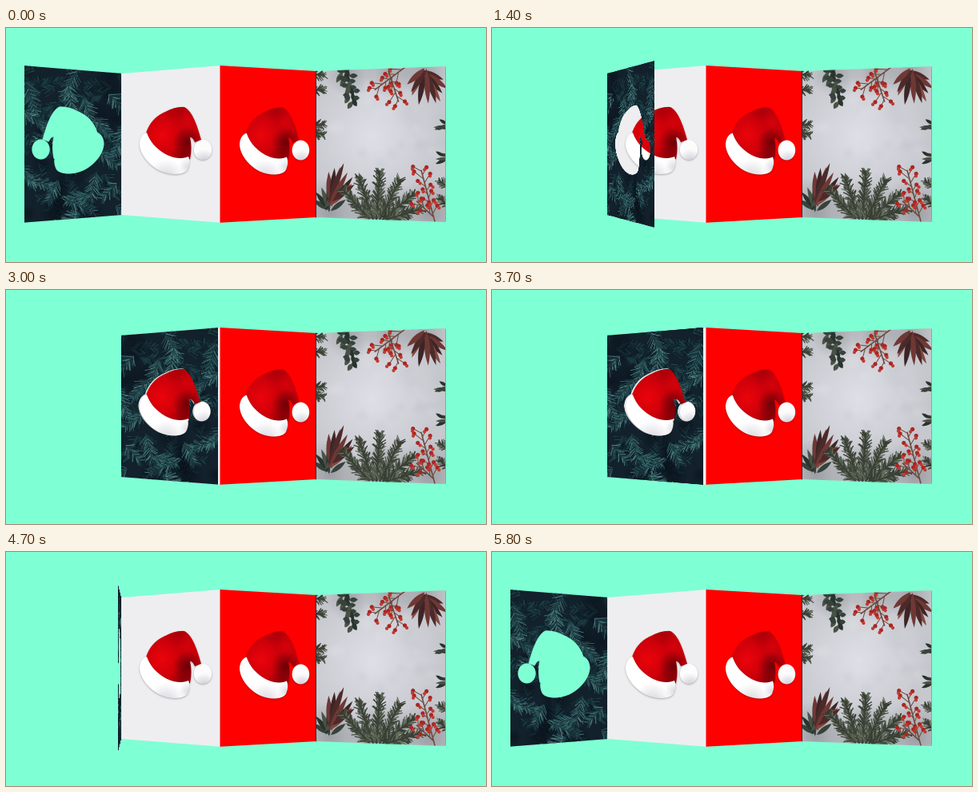
An HTML page with a canvas that plays this animation: 600x293 px, repeating every 5.9 s.

```html
<!DOCTYPE html>
<html lang="en">
<head>
<meta charset="utf-8">
<title>Folding card</title>
<style>
  html, body { margin: 0; width: 100%; height: 100%; overflow: hidden; background: #7fffd4; }
  canvas { display: block; }
</style>
</head>
<body>
<canvas id="stage" width="600" height="293"></canvas>
<script>
const W = 600, H = 293, RES = 2, TAU = Math.PI * 2;
const LOOP = 5900, STEP = 100, FOLD_START = -30, UNFOLD_END = 5810, FOLD_TIME = 2260;
const HINGE = 144, MID = 145.5, FLAP = 137, DEPTH = 850;
const CLOSED = 37 * Math.PI / 180, OPEN = Math.PI - CLOSED;

let seed = 11;
function rnd(a, b) {
  seed = (seed * 16807) % 2147483647;
  return a + (b - a) * seed / 2147483647;
}
const pick = list => list[Math.floor(rnd(0, list.length))];

function layer() {
  const c = document.createElement('canvas');
  c.width = W * RES;
  c.height = H * RES;
  const g = c.getContext('2d');
  g.scale(RES, RES);
  g.lineCap = 'round';
  return g;
}

function quad(g, x0, t0, b0, x1, t1, b1) {
  g.beginPath();
  g.moveTo(x0, t0);
  g.lineTo(x1, t1);
  g.lineTo(x1, b1);
  g.lineTo(x0, b0);
  g.closePath();
}

function dot(g, x, y, r, color) {
  g.fillStyle = color;
  g.beginPath();
  g.arc(x, y, r, 0, TAU);
  g.fill();
}

function glow(g, x, y, r, rgb, alpha) {
  const grad = g.createRadialGradient(x, y, 0, x, y, r);
  grad.addColorStop(0, `rgba(${rgb},${alpha})`);
  grad.addColorStop(1, `rgba(${rgb},0)`);
  g.fillStyle = grad;
  g.fillRect(x - r, y - r, r * 2, r * 2);
}

// Draws a line from a point and returns its far end.
function ray(g, x, y, angle, len, color, width) {
  const end = [x + Math.cos(angle) * len, y + Math.sin(angle) * len];
  g.strokeStyle = color;
  g.lineWidth = width;
  g.beginPath();
  g.moveTo(x, y);
  g.lineTo(...end);
  g.stroke();
  return end;
}

function leaf(g, x, y, angle, len, wide, color) {
  g.save();
  g.translate(x, y);
  g.rotate(angle);
  g.fillStyle = color;
  g.beginPath();
  g.moveTo(0, 0);
  g.quadraticCurveTo(len * .45, -wide, len, 0);
  g.quadraticCurveTo(len * .45, wide, 0, 0);
  g.fill();
  g.restore();
}

// Leaves spread evenly around a direction, longest in the middle.
function fan(g, x, y, angle, spread, count, len, wide, tones) {
  for (let i = 0; i < count; i++) {
    const off = i / (count - 1) - .5;
    leaf(g, x + rnd(-4, 4), y + rnd(-4, 4), angle + off * spread,
      len * (1 - Math.abs(off) * .7), wide, tones[i % tones.length]);
  }
}

// A twig with needles leaning forward on both sides.
function sprig(g, x, y, angle, len, needle, tones, width) {
  for (let d = 0; d < len; d += 1.4) {
    for (const side of [-1, 1]) {
      ray(g, x + Math.cos(angle) * d, y + Math.sin(angle) * d, angle + side * rnd(.35, 1),
        needle * rnd(.6, 1.15) * (1 - .45 * d / len), pick(tones), width);
    }
  }
  ray(g, x, y, angle, len, tones[0], width * 1.4);
}

// A bare twig with berries on alternating stalks.
function berryTwig(g, x, y, angle, len) {
  const wood = '#6b4a3f';
  ray(g, x, y, angle, len, wood, 1.6);
  for (let d = len * .2, side = 1; d <= len; d += 5, side = -side) {
    const [bx, by] = ray(g, x + Math.cos(angle) * d, y + Math.sin(angle) * d,
      angle + side * rnd(.5, .9), rnd(7, 15), wood, 1);
    dot(g, bx, by, 2.6, '#a92622');
    dot(g, bx + rnd(-3, 3), by + 3, 2.1, '#c23a30');
  }
}

const cap = new Path2D('M174 136C177 122 185 111 199 105Q212 98 223 99C233 104 239 122 244 140L236 143Q233 136 230 137Q233 150 230 164Q212 169 195 160Q180 151 174 136Z');
const brim = new Path2D('M176 131C170 133 167 139 167 146C168 159 179 172 193 179C207 185 223 184 227 177Q231 168 228 161C216 166 202 161 192 153C183 146 179 139 176 131Z');
const pom = new Path2D();
pom.ellipse(246, 152.5, 11.2, 12.5, 0, 0, TAU);

function shade(g, path, color, paint) {
  g.save();
  g.shadowColor = 'rgba(40,0,10,.3)';
  g.shadowBlur = 4;
  g.shadowOffsetY = 2;
  g.fillStyle = color;
  g.fill(path);
  g.restore();
  g.save();
  g.clip(path);
  paint();
  g.restore();
}

function drawHat(g) {
  shade(g, cap, '#c6000a', () => {
    glow(g, 195, 134, 28, '240,4,10', .9);
    glow(g, 227, 118, 14, '225,5,12', .5);
    glow(g, 214, 101, 17, '140,0,8', .5);
    glow(g, 227, 143, 19, '75,0,6', .75);
    glow(g, 223, 163, 19, '85,0,6', .6);
  });
  shade(g, brim, '#fff', () => {
    glow(g, 200, 188, 24, '170,170,185', .5);
    glow(g, 228, 174, 12, '175,175,188', .45);
  });
  shade(g, pom, '#fcfcfd', () => glow(g, 248, 168, 16, '165,165,180', .6));
}

function drawTable(g) {
  const pine = ['#3a3f33', '#4a5344', '#333c33', '#667060'];
  const rust = ['#4c2a2a', '#6f3835', '#3c2526', '#82483f'];
  const sage = ['#36423a', '#29332d', '#4a5246'];
  g.save();
  quad(g, 387.5, 54, 237, 549.5, 48, 243);
  g.clip();
  g.fillStyle = '#c6c8ce';
  g.fillRect(387, 40, 164, 210);
  glow(g, 458, 135, 90, '224,225,232', .95);
  for (let i = 0; i < 50; i++) glow(g, rnd(390, 548), rnd(55, 240), rnd(6, 16), pick(['184,188,196', '228,230,235']), .2);
  for (const x of [405, 470, 530]) glow(g, x, 232, 45, '95,98,100', .4);
  for (const x of [430, 480, 522]) glow(g, x, 55, 32, '95,98,100', .35);

  // Left edge
  for (const y of [58, 78, 122, 130]) sprig(g, 383, y, rnd(-.2, .3), 15, 10, pine, 1.2);

  // Top
  for (let i = 0; i < 6; i++) fan(g, 424 + i * 2, 52 + i * 7.5, 1.57, 3.2, 4, 17 - i, 6, sage);
  berryTwig(g, 503, 46, 2.5, 52);
  berryTwig(g, 478, 54, 1.25, 40);
  fan(g, 522, 54, 1.4, 2, 10, 46, 7, rust);

  // Bottom
  fan(g, 402, 228, -1.6, 1.9, 7, 36, 6, sage);
  fan(g, 405, 220, -1.2, 1.1, 9, 54, 7, rust);
  for (let i = 0; i < 6; i++) sprig(g, 455 + i * 4, 240, -2.3 + i * .4, 61 - Math.abs(i - 2) * 5, 14, pine, 1.3);
  berryTwig(g, 537, 246, -1.83, 70);
  berryTwig(g, 534, 236, -2.4, 28);

  // Right edge
  for (const y of [200, 222]) sprig(g, 553, y, -2.5, 15, 10, pine, 1.2);
  for (const y of [124, 164]) fan(g, 551, y, 3.1, 1.2, 5, 18, 4, sage);
  g.restore();
  ray(g, 387.5, 54, Math.PI / 2, 183, '#5c1a1c', 1);
  ray(g, 549.5, 49, Math.PI / 2, 193, '#8b9697', .8);
}

function makeScene() {
  const g = layer();
  g.fillStyle = '#7fffd4';
  g.fillRect(0, 0, W, H);
  quad(g, 144.5, 57, 234, 268, 47, 243.7);
  g.fillStyle = '#eeeef0';
  g.fill();
  quad(g, 267.5, 47, 243.7, 388, 54, 237);
  g.fillStyle = '#fe0000';
  g.fill();
  drawTable(g);
  drawHat(g);
  g.translate(130.5, .5);
  g.scale(.967, 1);
  drawHat(g);
  return g.canvas;
}

// The flap is painted as it appears when folded shut.
function makeFlap() {
  const g = layer();
  const dim = ['#15282f', '#1b3a42', '#20464d', '#0e1c25'];
  const lit = ['#1d3539', '#2b595e', '#3a7073', '#1c434b', '#578a8a'];
  g.save();
  quad(g, 143, 57, 234, 267, 47, 243.7);
  g.clip();
  g.fillStyle = '#12212b';
  g.fillRect(140, 40, 130, 210);
  for (let i = 0; i < 40; i++) sprig(g, rnd(143, 267), rnd(48, 242), rnd(0, TAU), rnd(22, 40), 14, dim, .9);
  for (let i = 0; i < 18; i++) glow(g, rnd(145, 266), rnd(50, 240), rnd(10, 22), '8,16,25', .6);
  for (let i = 0; i < 26; i++) {
    const x = 150 + i % 4 * 36 + rnd(-14, 14), y = 52 + i * 7.4 + rnd(-10, 10);
    sprig(g, x, y, rnd(.2, 2.9), rnd(24, 42), 15, lit, .7);
  }
  g.restore();

  g.globalCompositeOperation = 'destination-out';
  g.translate(-1.5, -.5);
  for (const part of [cap, brim, pom]) g.fill(part);
  return g.canvas;
}

// 0 is open, 1 lies on the second panel.
function progress(t) {
  const u = Math.min(t - FOLD_START, UNFOLD_END - t) / FOLD_TIME;
  return (1 - Math.cos(Math.PI * Math.max(0, Math.min(1, u)))) / 2;
}

const zoom = (q, angle) => 1 / (1 - q * FLAP * Math.sin(angle) / DEPTH);
const reach = (q, angle) => q * FLAP * Math.cos(angle) * zoom(q, angle);

const ctx = document.getElementById('stage').getContext('2d');
const scene = makeScene(), flap = makeFlap();

// Perspective by one-pixel columns.
function drawFlap(angle) {
  const c = FLAP * Math.cos(angle), k = FLAP * Math.sin(angle) / DEPTH;
  const edge = reach(1, angle), dir = Math.sign(edge), count = Math.round(Math.abs(edge));
  const along = dx => Math.min(1, dx / (c + dx * k));
  for (let i = 0; i < count; i++) {
    const q = along(dir * (i + .5));
    const from = reach(along(dir * i), CLOSED), to = reach(along(dir * (i + 1)), CLOSED);
    const r = zoom(q, angle) / zoom(q, CLOSED);
    const x = dir > 0 ? HINGE + i : HINGE - i - 1;
    ctx.drawImage(flap, (HINGE + from) * RES, 0, Math.max(.5, to - from) * RES, H * RES,
      x, MID * (1 - r), 1, H * r);
  }
}

function frame() {
  const t = Math.floor(performance.now() % LOOP / STEP) * STEP;
  ctx.drawImage(scene, 0, 0, W, H);
  drawFlap(OPEN + (CLOSED - OPEN) * progress(t));
  requestAnimationFrame(frame);
}
frame();
</script>
</body>
</html>
```
